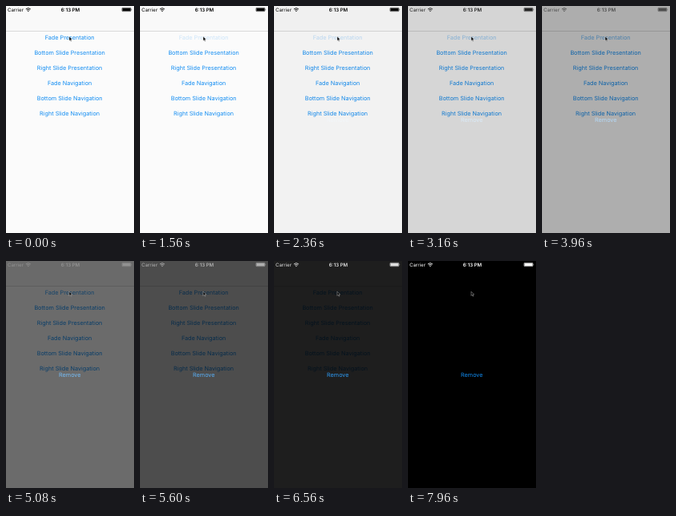
Write an HTML page that moves like this. It is 160 by 284 pixels and loops after 8000 ms.

```html
<!DOCTYPE html>
<html lang="en">
<head>
<meta charset="utf-8">
<style>
  html, body { margin: 0; width: 100%; height: 100%; overflow: hidden; background: #fbfbfb; }
  svg { display: block; width: 100vw; height: 100vh; }
  text { font-family: Inter, Roboto, sans-serif; text-rendering: geometricPrecision; }
  .button { font-size: 7.25px; fill: #108cf2; text-anchor: middle; }
  .status { font-size: 6.1px; }
</style>
</head>
<body>
<svg viewBox="0 0 160 284">
  <rect width="160" height="284" fill="#fbfbfb"/>
  <rect width="160" height="31" fill="#f9f9f9"/>
  <rect y="31" width="160" height=".5" fill="#b8b8b8"/>
  <g id="menu"></g>

  <g id="modal">
    <rect width="160" height="284"/>
    <text class="button" x="79.8" y="144.7">Remove</text>
  </g>

  <g id="status">
    <text class="status" x="2" y="6.8">Carrier</text>
    <text class="status" x="80.5" y="6.8" text-anchor="middle" font-weight="600">6:13 PM</text>
    <g fill="none" stroke="currentColor" stroke-width=".9">
      <path d="M24.8 3.9Q27.8 1.2 30.8 3.9M25.9 5.2Q27.8 3.5 29.7 5.2"/>
      <rect x="145" y="2.3" width="11.2" height="4.4" rx="1" stroke-width=".5"/>
    </g>
    <path d="M26.8 6.1Q27.8 5.2 28.8 6.1L27.8 7.2ZM145.5 2.8h10.2v3.4h-10.2zM156.8 3.7q1 .8 0 1.6z"/>
  </g>

  <path d="M79 38.3v5.1l1.1-1.1.9 1.9.9-.4-.9-1.9h1.6z" fill="#000" stroke="#ddd" stroke-width=".4"/>
</svg>
<script>
const LOOP = 8000;
const PRESS_END = 1500;
const RELEASE = { start: 1600, duration: 4700 };
const PRESENT = { start: 1700, duration: 6200 };
const PRESSED_ALPHA = 0.2;

const byId = id => document.getElementById(id);
const menu = byId("menu"), modal = byId("modal"), statusBar = byId("status");

const labels = [
  "Fade Presentation", "Bottom Slide Presentation", "Right Slide Presentation",
  "Fade Navigation", "Bottom Slide Navigation", "Right Slide Navigation"
];
menu.innerHTML = labels.map((label, i) =>
  `<text class="button" x="79.6" y="${41.9 + i * 19.1}">${label}</text>`).join("");
const pressedButton = menu.firstElementChild;

function ease(time, start, duration) {
  const x = Math.min(1, Math.max(0, (time - start) / duration));
  return x * x * (3 - 2 * x);
}

function draw(time) {
  const press = ease(time, 0, PRESS_END);
  const release = ease(time, RELEASE.start, RELEASE.duration);
  const shown = ease(time, PRESENT.start, PRESENT.duration);
  pressedButton.setAttribute("opacity", 1 - (1 - PRESSED_ALPHA) * press * (1 - release));
  modal.setAttribute("opacity", shown);

  // The status bar turns from black to white as the modal appears.
  const level = Math.round(255 * shown);
  const color = `rgb(${level},${level},${level})`;
  statusBar.setAttribute("fill", color);
  statusBar.setAttribute("color", color);
}

const origin = performance.now();
function tick() {
  draw((performance.now() - origin) % LOOP);
  requestAnimationFrame(tick);
}
draw(0);
requestAnimationFrame(tick);
</script>
</body>
</html>
```
